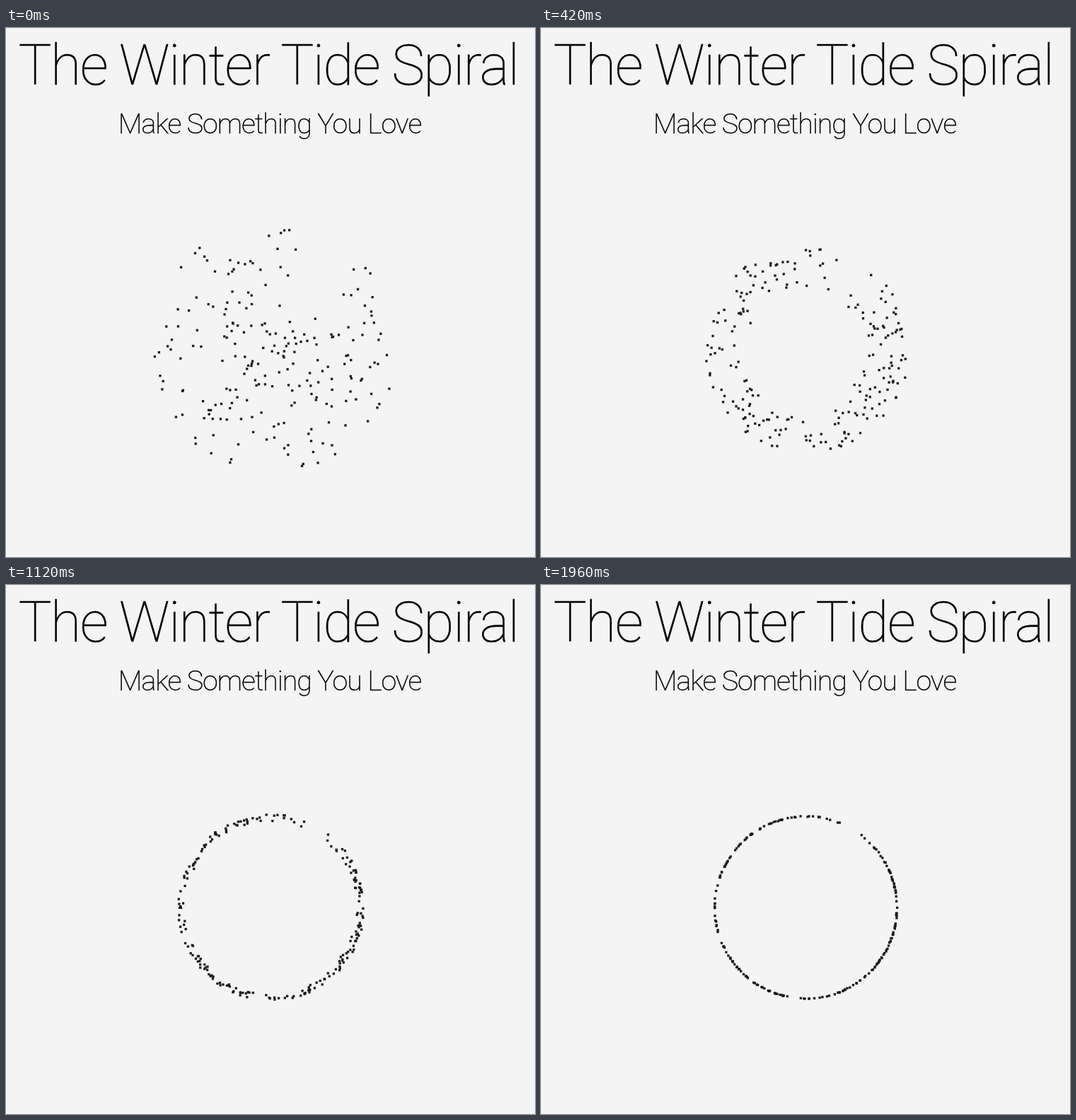
An HTML page with a canvas that plays this animation: 748 px wide and 748 px high, repeating every 2030 ms.

```html
<!DOCTYPE html>
<html lang="en">
<head>
<meta charset="utf-8">
<title>Gathering dots</title>
<style>
  html, body { margin: 0; width: 100%; height: 100%; overflow: hidden; background: #f4f4f4; }
  canvas, svg { position: absolute; left: 0; top: 0; }
  text {
    font-family: Roboto, Inter, sans-serif;
    font-weight: 100;
    letter-spacing: -.021em;
    text-anchor: middle;
    stroke: #000;
    stroke-width: .5px;
  }
  .tagline { letter-spacing: -.026em; }
</style>
</head>
<body>
<canvas id="stage" width="748" height="748"></canvas>
<svg width="748" height="748">
  <text x="371" y="80" font-size="79">The Winter Tide Spiral</text>
  <text class="tagline" x="373" y="149" font-size="39.4">Make Something You Love</text>
</svg>
<script>
const ctx = document.getElementById('stage').getContext('2d');
const LOOP = 2030, STEP = 70, HALF_LIFE = 280;
const CX = 374.5, CY = 456, RING = 129, SPREAD = 178;
const COUNT = 220, DOT = 3.3;

let seed = 29;
function random() {
  seed = (seed * 16807) % 2147483647;
  return seed / 2147483647;
}

// Each dot starts somewhere in a disc, near the direction of its place on the ring.
const dots = Array.from({ length: COUNT }, () => {
  const angle = random() * 2 * Math.PI;
  const radius = SPREAD * random() ** 0.75;
  const drift = (random() - 0.5) * 0.3;
  return {
    from: polar(angle + drift, radius),
    to: polar(angle, RING)
  };
});

function polar(angle, radius) {
  return { x: CX + radius * Math.cos(angle), y: CY + radius * Math.sin(angle) };
}

function draw(elapsed) {
  const time = Math.floor(elapsed % LOOP / STEP) * STEP;
  const away = 0.5 ** (time / HALF_LIFE);
  const mix = (to, from) => to + (from - to) * away - DOT / 2;
  ctx.clearRect(0, 0, 748, 748);
  ctx.fillStyle = '#1c1c1c';
  for (const { from, to } of dots) {
    ctx.fillRect(mix(to.x, from.x), mix(to.y, from.y), DOT, DOT);
  }
}

const origin = performance.now();
function tick() {
  draw(performance.now() - origin);
  requestAnimationFrame(tick);
}
tick();
</script>
</body>
</html>
```
